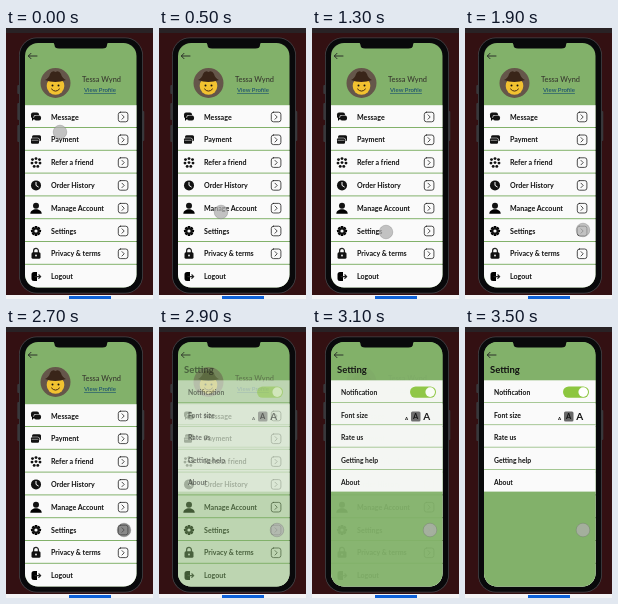
These frames come from a looping animation (147 by 271 pixels, 4.1 s). An HTML page:

```html
<!DOCTYPE html>
<html lang="en">
<head>
<meta charset="utf-8">
<title>Profile menu</title>
<style>
  html, body { margin: 0; width: 100%; height: 100%; overflow: hidden; background: #331012; }
  svg { display: block; width: 100%; height: 100%; }
  text { font: 700 7.1px Lato, sans-serif; fill: #111; }
  .line { fill: none; stroke: #222; stroke-linecap: round; stroke-linejoin: round; }
  #settings > * { opacity: var(--fade); }
</style>
</head>
<body>
<svg id="stage" viewBox="0 0 147 271" preserveAspectRatio="none"></svg>
<script>
const GREEN = '#82b16a', PAPER = '#fafafa';
const LOOP = 4100, STEP = 100;

const rect = (x, y, w, h, fill, r = 0) =>
  `<rect x="${x}" y="${y}" width="${w}" height="${h}" rx="${r}" fill="${fill}"/>`;
const dot = (x, y, r, fill = '#111') => `<circle cx="${x}" cy="${y}" r="${r}" fill="${fill}"/>`;
const line = (d, width = 1, color = '#222') =>
  `<path class="line" d="${d}" style="stroke:${color};stroke-width:${width}"/>`;
const label = (x, y, text, style = '') => `<text x="${x}" y="${y}" style="${style}">${text}</text>`;

// Icons are centred on the origin.
const icons = {
  message: rect(-5, -4.5, 8, 6, '#111', 2) + rect(-2.5, -2, 8, 6.3, PAPER, 2) +
    rect(-2, -1.5, 7, 5, '#111', 2) + '<path d="M-4 1v3l3-3z"/>',
  payment: rect(-4, -4.5, 9, 6, '#111', 1.5) + rect(-5.5, -2, 9, 6.5, PAPER, 1.5) +
    rect(-5, -1.5, 8, 5.5, '#111', 1.2) + line('M-4 .5H2', .6, '#ddd'),
  refer: [[-3.5, -3], [0, -4], [3.5, -3], [-4, .5], [0, 0], [4, .5], [-1.8, 3.8], [1.8, 3.8]]
    .map(([x, y]) => dot(x, y, 1.45)).join(''),
  clock: dot(0, 0, 5) + line('M0-3V0L2.3 1.5', 1, PAPER),
  person: dot(0, -2.5, 3) + '<path d="M-5.7 5.5C-5.7-.5 5.7-.5 5.7 5.5z"/>',
  gear: [0, 45, 90, 135].map(a =>
    `<rect x="-1.3" y="-5" width="2.6" height="10" rx=".5" transform="rotate(${a})"/>`).join('') +
    dot(0, 0, 3.8) + dot(0, 0, 1.6, PAPER),
  lock: line('M-2.4-1V-3a2.4 2.4 0 0 1 4.8 0V-1', 1.3) + rect(-4.5, -1.5, 9, 6.5, '#111', 1.5) +
    dot(0, 1.7, .9, PAPER),
  logout: '<path d="M1-4.5H-2a2.5 2.5 0 0 0-2.5 2.5V2A2.5 2.5 0 0 0-2 4.5H1z"/>' +
    line('M-1 0H4.5M2.8-1.8L4.7 0L2.8 1.8', 1.2)
};

const backArrow = line('M31 28H22.5M25 25.3L22.3 28L25 30.7', .9);

const avatar = dot(49.5, 55, 15, '#65564a') + dot(49.5, 58, 8.8, '#f2c230') +
  '<path d="M39 52Q49 56 60 52Q56 50 55 46Q53 42 49.5 44Q46 42 44 46Q43 50 39 52z" fill="#392519"/>' +
  dot(46.5, 57.5, 1) + dot(52.5, 57.5, 1) + line('M45.5 61Q49.5 65.5 53.5 61', 1, '#4a2a12');

const menu = [
  ['message', 'Message'], ['payment', 'Payment'], ['refer', 'Refer a friend'],
  ['clock', 'Order History'], ['person', 'Manage Account'], ['gear', 'Settings'],
  ['lock', 'Privacy &amp; terms'], ['logout', 'Logout']
];

const menuRow = ([icon, name], i) => {
  const y = 89 + i * 22.8;
  const chevron = line(`M114.5 ${y - 4.8}h5.2q2.2 0 2.2 2.2v5.2q0 2.2-2.2 2.2h-5.2q-2.2 0-2.2-2.2v-5.2q0-2.2 2.2-2.2z
    M116 ${y - 2.2}l2.2 2.2l-2.2 2.2`, .8);
  return rect(18, y - 11.8, 113, i < 7 ? 21.8 : 30, PAPER) +
    `<g transform="translate(30 ${y})">${icons[icon]}</g>` +
    label(45, y + 2.6, name) + (i < 7 ? chevron : '');
};

const profilePage = rect(18, 14, 113, 250, GREEN) + backArrow + avatar +
  label(76, 54, 'Tessa Wynd', 'font-size:7.4px;font-weight:500;fill:#38382f') +
  label(78, 64, 'View Profile', 'font-size:6px;font-weight:500;fill:#174d70;text-decoration:underline') +
  menu.map(menuRow).join('');

const settingsRow = (name, i) => {
  const y = 53.3 + i * 22.4;
  return rect(18, y, 113, 21.7, PAPER) + label(29, y + 15, name, 'font-size:6.8px');
};

const settingsPage = rect(18, 14, 113, 250, GREEN) + backArrow +
  label(25, 46, 'Setting', 'font-size:9.5px') +
  ['Notification', 'Font size', 'Rate us', 'Getting help', 'About'].map(settingsRow).join('') +
  rect(98, 59.4, 26, 11.4, '#8cc63f', 5.7) + dot(118.2, 65.1, 4.8, '#fff') +
  label(93, 92.5, 'A', 'font-size:4.5px') + rect(99, 84.5, 9.5, 10, '#686868', 1.5) +
  label(101, 92.3, 'A', 'font-size:7.5px') + label(111.2, 93, 'A', 'font-size:10px');

const backdrop = rect(0, 0, 147, 271, '#331012') + rect(0, 0, 147, 5, '#292225') +
  rect(0, 267, 147, 4, '#f4f4f5') + rect(63, 268, 42, 3, '#0f62d8') +
  [[11.3, 57, 9], [11.3, 75, 17], [11.3, 97, 17], [135.8, 83, 30]]
    .map(([x, y, h]) => rect(x, y, 2.5, h, '#38383b', 1)).join('') +
  rect(13, 9.5, 124, 256, '#444448', 18) + rect(13.8, 10.3, 122.4, 254.4, '#09090b', 17);

const stage = document.getElementById('stage');
stage.innerHTML = `<defs><clipPath id="screen">${rect(19, 15, 111.5, 244.5, '#000', 13)}</clipPath></defs>
  ${backdrop}
  <g clip-path="url(#screen)">${profilePage}<g id="settings">${settingsPage}</g></g>
  <path d="M46 14H103Q101 15 101 17Q101 20.5 96.5 20.5H53Q48.5 20.5 48.5 17Q48.5 15 46 14z" fill="#09090b"/>
  <circle id="cursor" r="6.8" stroke="rgba(110,110,110,.45)" stroke-width=".7"/>`;
const settings = document.getElementById('settings');
const cursor = document.getElementById('cursor');

// Each key holds time, then values.
const pointerPath = [
  [100, 54, 104], [500, 62, 184], [700, 65, 235], [900, 67, 228], [1100, 71, 210],
  [1300, 74, 204], [1500, 84, 203], [1700, 106, 203], [1900, 118, 202], [2000, 118, 203]
];
const dissolve = [[2800, 0], [2900, .5], [3000, .87], [3100, .95], [3400, 1]];

function sample(keys, t) {
  const next = keys.findIndex(k => k[0] >= t);
  if (next < 0) return keys[keys.length - 1].slice(1);
  if (next === 0) return keys[0].slice(1);
  const a = keys[next - 1], b = keys[next];
  const u = (t - a[0]) / (b[0] - a[0]);
  return a.slice(1).map((v, i) => v + (b[i + 1] - v) * u);
}

function draw(now) {
  const t = Math.floor(now % LOOP / STEP) * STEP;
  const [x, y] = sample(pointerPath, t);
  const pressed = t >= 2700 && t < 2900;
  settings.style.setProperty('--fade', sample(dissolve, t)[0]);
  cursor.setAttribute('cx', x);
  cursor.setAttribute('cy', y);
  cursor.setAttribute('fill', pressed ? 'rgba(90,90,90,.7)' : 'rgba(175,175,175,.75)');
}

const start = performance.now();
function tick() {
  draw(performance.now() - start);
  requestAnimationFrame(tick);
}
tick();
</script>
</body>
</html>
```
